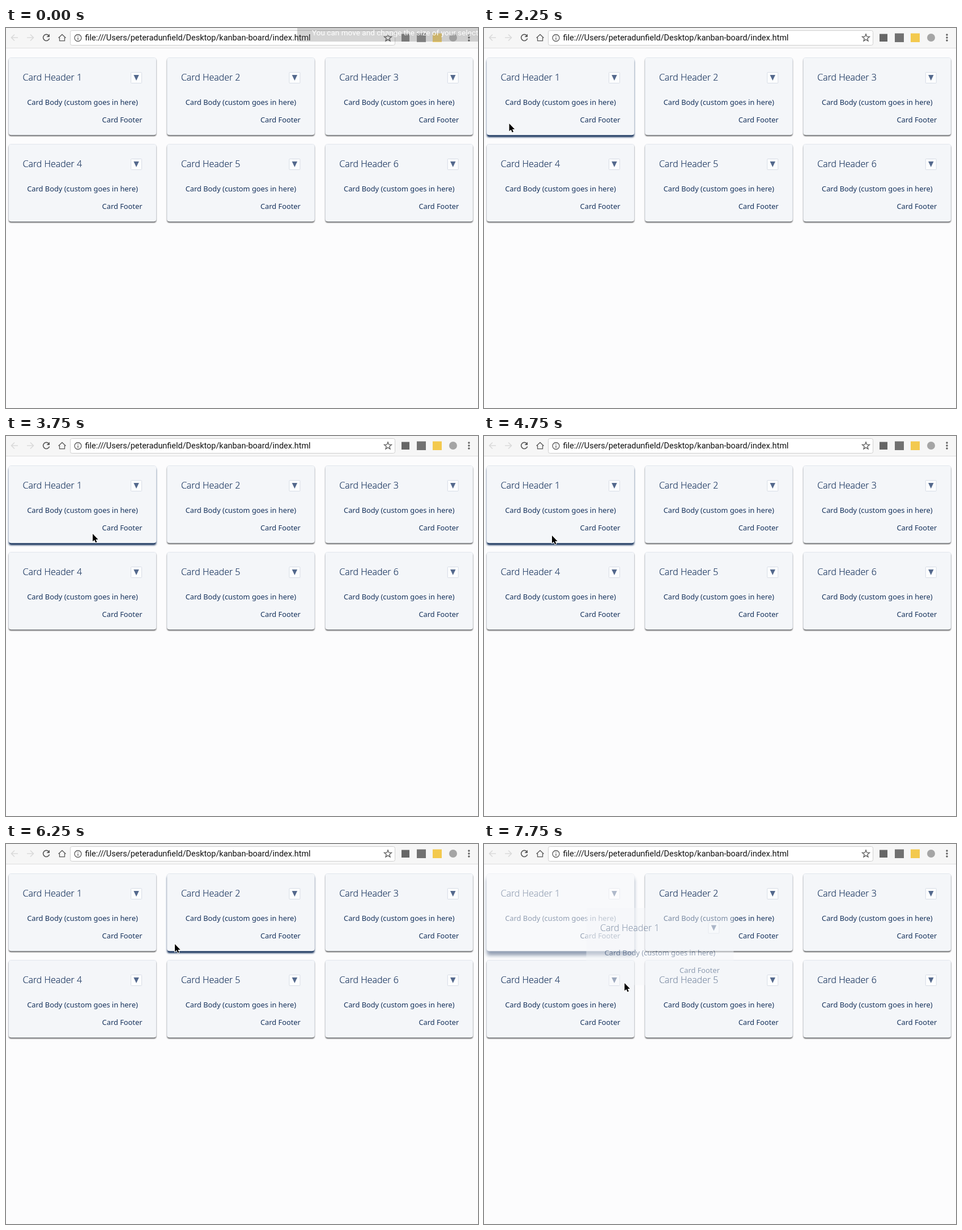
An HTML page that plays this animation: 833 px wide and 672 px high, repeating every 8 s.

```html
<!DOCTYPE html>
<html lang="en">
<head>
<meta charset="utf-8">
<title>Kanban board</title>
<style>
  html, body { margin: 0; width: 100%; height: 100%; overflow: hidden; background: #fcfcfd; }
  svg { display: block; width: 833px; height: 672px; }
  .url { font: 14.45px Roboto, sans-serif; fill: #111; }
  .tip { font: 13.58px Roboto, sans-serif; fill: #fff; }
  .head { font: 300 16px "Open Sans", sans-serif; fill: #16325c; stroke: #16325c; stroke-width: 0.2; }
  .text { font: 12.83px "Noto Sans", sans-serif; fill: #16325c; }
  .icon { fill: none; stroke: #5a5a5a; stroke-width: 1.6; }
  .thin { stroke-width: 1.3; }
  .off { stroke: #dadada; }
  .shadow { display: none; }
  .rest .flat, .hover .raised, .press .lifted { display: inline; }
</style>
</head>
<body>
<svg viewBox="0 0 833 672">
  <defs>
    <filter id="soft" x="-10%" y="-10%" width="120%" height="125%"><feGaussianBlur stdDeviation="0.9"/></filter>
    <filter id="softer" x="-10%" y="-10%" width="120%" height="125%"><feGaussianBlur stdDeviation="1.6"/></filter>
    <filter id="softest" x="-10%" y="-10%" width="120%" height="130%"><feGaussianBlur stdDeviation="3"/></filter>
    <rect id="plate" x="5" y="52.5" width="260" height="136.5" rx="4"/>
  </defs>
  <rect width="833" height="672" fill="#fcfcfd"/>

  <g id="toolbar">
    <rect width="833" height="35" fill="#f6f6f6"/>
    <path d="M0 35.5H833" stroke="#dedede"/>
    <path class="icon off" d="M21 17H10M15 11.5L9.5 17L15 22.5M37 17H48M43 11.5L48.5 17L43 22.5"/>
    <path class="icon" d="M75.2 13A5.6 5.6 0 1 0 76.6 18.5"/>
    <path d="M77 10.5V16H71.5Z" fill="#5a5a5a"/>
    <path class="icon thin" d="M92.5 17.5L99 11.5L105.5 17.5M94.5 16.5V22.7H103.5V16.5"/>
    <rect x="113.5" y="4.5" width="573" height="26" rx="3" fill="#fff" stroke="#cfcfcf"/>
    <circle class="icon thin" cx="127" cy="17.5" r="6"/>
    <path class="icon thin" d="M127 13.8V15.3M127 16.7V21"/>
    <text class="url" x="139.5" y="22">file:///Users/peteradunfield/Desktop/kanban-board/index.html</text>
    <path id="star" class="icon thin"/>
    <g id="extensions">
      <rect x="698" y="10.5" width="14" height="13.5" fill="#666"/>
      <rect x="725" y="9.5" width="16" height="15.5" fill="#717171"/>
      <rect x="753" y="9.5" width="16" height="15.5" fill="#f3c94e"/>
      <circle cx="789" cy="17" r="7" fill="#a5a5a5"/>
    </g>
    <g fill="#5f5f5f">
      <circle cx="817" cy="12" r="1.7"/><circle cx="817" cy="17" r="1.7"/><circle cx="817" cy="22" r="1.7"/>
    </g>
  </g>

  <g id="cards"></g>
  <use id="ghost" href="#face0" transform="translate(175.5 60.5)" opacity=".45"/>
  <g id="hint">
    <rect x="514" width="319" height="24" fill="#555" opacity=".25"/>
    <text class="tip" x="540" y="13">You can move and change the size of your selection</text>
  </g>
  <path id="cursor" d="M0 0V13.6L3.1 10.8L5.2 15.4L7.5 14.4L5.4 9.9H9.6Z"
    fill="#000" stroke="#fff" stroke-width="1.8" paint-order="stroke" stroke-linejoin="round"/>
</svg>
<script>
const LOOP = 8000;
const DRAG = 7750;
const find = id => document.getElementById(id);
const show = (node, on) => node.setAttribute('visibility', on ? 'visible' : 'hidden');

// start time, pointer x, pointer y, active card, its state
const steps = [
  [750, 446, 150], [1000, 363, 149], [1250, 177, 138], [1500, 82, 178], [1750, 78, 179],
  [2000, 66, 177, 0, 'hover'],
  [2250, 44.5, 169, 0, 'hover'],
  [2750, 320, 169, 1, 'hover'],
  [3000, 330, 169, 1, 'hover'],
  [3750, 153, 173, 0, 'hover'],
  [4000, 120, 174, 0, 'hover'],
  [4250, 120, 176, 0, 'press'],
  [4750, 120, 176, 0, 'hover'],
  [5250, 259, 175, 0, 'hover'],
  [5500, 299, 176, 1, 'hover'],
  [5750, 298, 176, 1, 'press'],
  [6250, 298, 177, 1, 'hover'],
  [6500, 282, 175, 1, 'hover'],
  [6750, 67, 181, 0, 'hover'],
  [7250, 72, 184, 0, 'press'],
  [7500, 75, 187, 0, 'press'],
  [7750, 248, 246, 0, 'press']
];

const shadow = (name, dy, blur, color, alpha) =>
  `<use class="shadow ${name}" href="#plate" y="${dy}" filter="url(#${blur})" fill="${color}" opacity="${alpha}"/>`;

function cardMarkup(i) {
  const x = (i % 3) * 279.4, y = Math.floor(i / 3) * 153;
  return `<g class="card rest" transform="translate(${x} ${y})">
    ${shadow('flat', 2, 'soft', '#000', 0.7)}
    ${shadow('raised', 4, 'softer', '#16325c', 1)}
    ${shadow('lifted', 8, 'softest', '#16325c', 1)}
    <use href="#plate" fill="none" stroke="#d0d7e2"/>
    <g id="face${i}">
      <use href="#plate" fill="#f4f6f9"/>
      <text class="head" x="29.5" y="93">Card Header ${i + 1}</text>
      <rect x="220.5" y="78.5" width="19" height="19" rx="1" fill="#fcfdfe" stroke="#d8dde6"/>
      <path d="M225.3 83H234.7L230 93Z" fill="#54698d"/>
      <text class="text" x="135" y="136" text-anchor="middle">Card Body (custom goes in here)</text>
      <text class="text" x="240.5" y="167" text-anchor="end">Card Footer</text>
    </g>
  </g>`;
}

function starPath(cx, cy, outer, inner) {
  const points = Array.from({ length: 10 }, (_, k) => {
    const a = k * Math.PI / 5 - Math.PI / 2, r = k % 2 ? inner : outer;
    return `${cx + r * Math.cos(a)} ${cy + r * Math.sin(a)}`;
  });
  return `M${points.join('L')}Z`;
}

find('star').setAttribute('d', starPath(674, 17.5, 6.8, 2.9));
find('cards').innerHTML = Array.from({ length: 6 }, (_, i) => cardMarkup(i)).join('');
const cards = [...document.querySelectorAll('.card')];
const cursor = find('cursor'), ghost = find('ghost'), hint = find('hint'), extensions = find('extensions');

function draw(t) {
  const step = steps.filter(s => s[0] <= t).pop();
  const [, x, y, active, state] = step || [];
  const dragging = t >= DRAG;
  show(hint, t < 250);
  show(cursor, !!step);
  show(ghost, dragging);
  if (step) cursor.setAttribute('transform', `translate(${x} ${y})`);
  extensions.setAttribute('opacity', t < 2000 ? 0.78 : 1);
  cards.forEach((card, i) => {
    card.setAttribute('class', 'card ' + (i === active ? state : 'rest'));
    card.setAttribute('opacity', dragging && i === active ? 0.45 : 1);
  });
}

function tick() {
  draw(performance.now() % LOOP);
  requestAnimationFrame(tick);
}
tick();
</script>
</body>
</html>
```
